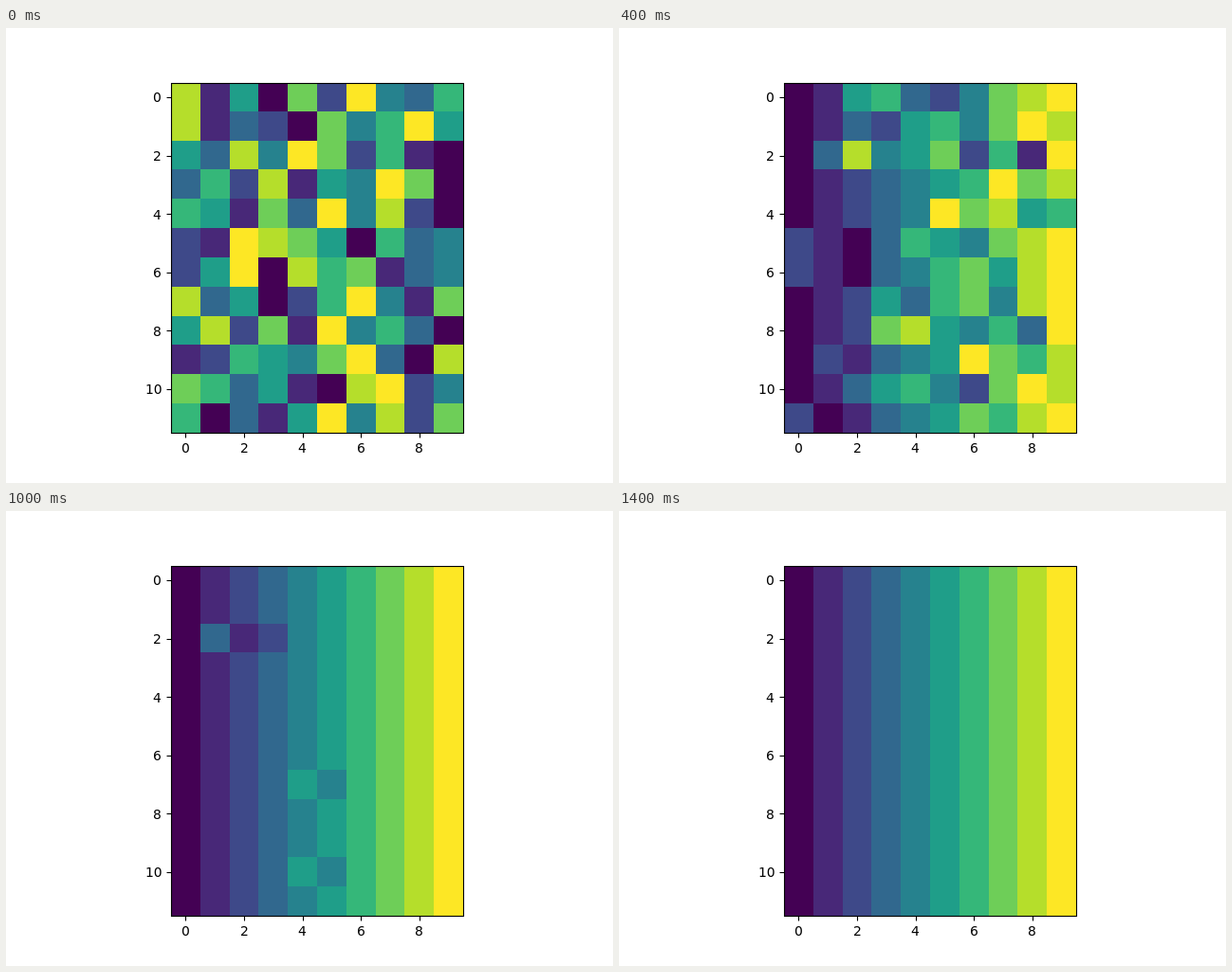
These frames come from a looping animation (640 px wide and 480 px high, 1800 ms). An HTML page with a canvas:

```html
<!DOCTYPE html>
<html lang="en">
<head>
<meta charset="utf-8">
<title>Quicksort heatmap</title>
<style>
  html, body { margin: 0; width: 100%; height: 100%; overflow: hidden; background: #fff; }
  canvas { display: block; }
</style>
</head>
<body>
<canvas id="stage" width="640" height="480"></canvas>
<script>
const ctx = document.getElementById('stage').getContext('2d');

const COLORS = ['#440154', '#482878', '#3e4989', '#31688e', '#26828e',
                '#1f9e89', '#35b779', '#6ece58', '#b5de2b', '#fde725'];
const START = ['8150729436', '8132074695', '5384972610', '3628154970',
               '6517394820', '2198750634', '2590867134', '8350269417',
               '5827194630', '1265479308', '7635108924', '6031594827'];
const STEP = 200, LAST = 7, LOOP = 1800;
const BOX = { left: 174, top: 58, right: 482, bottom: 427 };
const CELL = 30.8;

// Partition a[lo..hi] around its middle value; returns the pivot's final index.
function partition(a, lo, hi) {
  const pivot = a[(lo + hi) >> 1];
  let i = lo, j = hi;
  while (true) {
    while (a[i] < pivot) i++;
    while (a[j] > pivot) j--;
    if (i >= j) return j;
    [a[i], a[j]] = [a[j], a[i]];
  }
}

// Quicksort one level at a time: every open range is partitioned per step.
function sortSteps(text) {
  const a = [...text].map(Number);
  const steps = [a.slice()];
  let ranges = [[0, a.length - 1]];
  for (let s = 1; s <= LAST; s++) {
    const next = [];
    for (const [lo, hi] of ranges) {
      if (lo >= hi) continue;
      const p = partition(a, lo, hi);
      next.push([lo, p], [p + 1, hi]);
    }
    ranges = next;
    steps.push(a.slice());
  }
  return steps;
}

const rows = START.map(sortSteps);
const colEdge = c => Math.round(BOX.left + c * CELL);
const rowEdge = r => r ? Math.ceil(57 + r * 370 / 12 - 0.5) : BOX.top;

function drawCells(step) {
  rows.forEach((steps, r) => {
    const y = rowEdge(r), h = rowEdge(r + 1) - y;
    steps[step].forEach((v, c) => {
      const x = colEdge(c);
      ctx.fillStyle = COLORS[v];
      ctx.fillRect(x, y, colEdge(c + 1) - x, h);
    });
  });
}

function line(x1, y1, x2, y2) {
  ctx.beginPath();
  ctx.moveTo(x1, y1);
  ctx.lineTo(x2, y2);
  ctx.stroke();
}

function drawAxes() {
  ctx.strokeStyle = ctx.fillStyle = '#000';
  ctx.lineWidth = 1.111;
  ctx.font = '13.889px "DejaVu Sans", sans-serif';
  ctx.strokeRect(BOX.left + 0.5, BOX.top + 0.5, BOX.right - BOX.left, BOX.bottom - BOX.top);

  for (let n = 0; n < 10; n += 2) {
    const x = BOX.left + (n + 0.5) * CELL, px = Math.round(x) + 0.5;
    line(px, BOX.bottom + 0.5, px, BOX.bottom + 5.5);
    ctx.fillText(n, Math.round(x - ctx.measureText(n).width / 2), 448);
  }
  for (let n = 0; n < 12; n += 2) {
    const y = 57.6 + (n + 0.5) * CELL, py = Math.round(y) + 0.5;
    line(BOX.left - 4.5, py, BOX.left + 0.5, py);
    ctx.fillText(n, Math.round(164.28 - ctx.measureText(n).width), Math.round(y + 5.4));
  }
}

function frame(now) {
  const step = Math.min(LAST, Math.floor(now % LOOP / STEP));
  ctx.fillStyle = '#fff';
  ctx.fillRect(0, 0, 640, 480);
  drawCells(step);
  drawAxes();
  requestAnimationFrame(frame);
}
frame(0);
</script>
</body>
</html>
```
